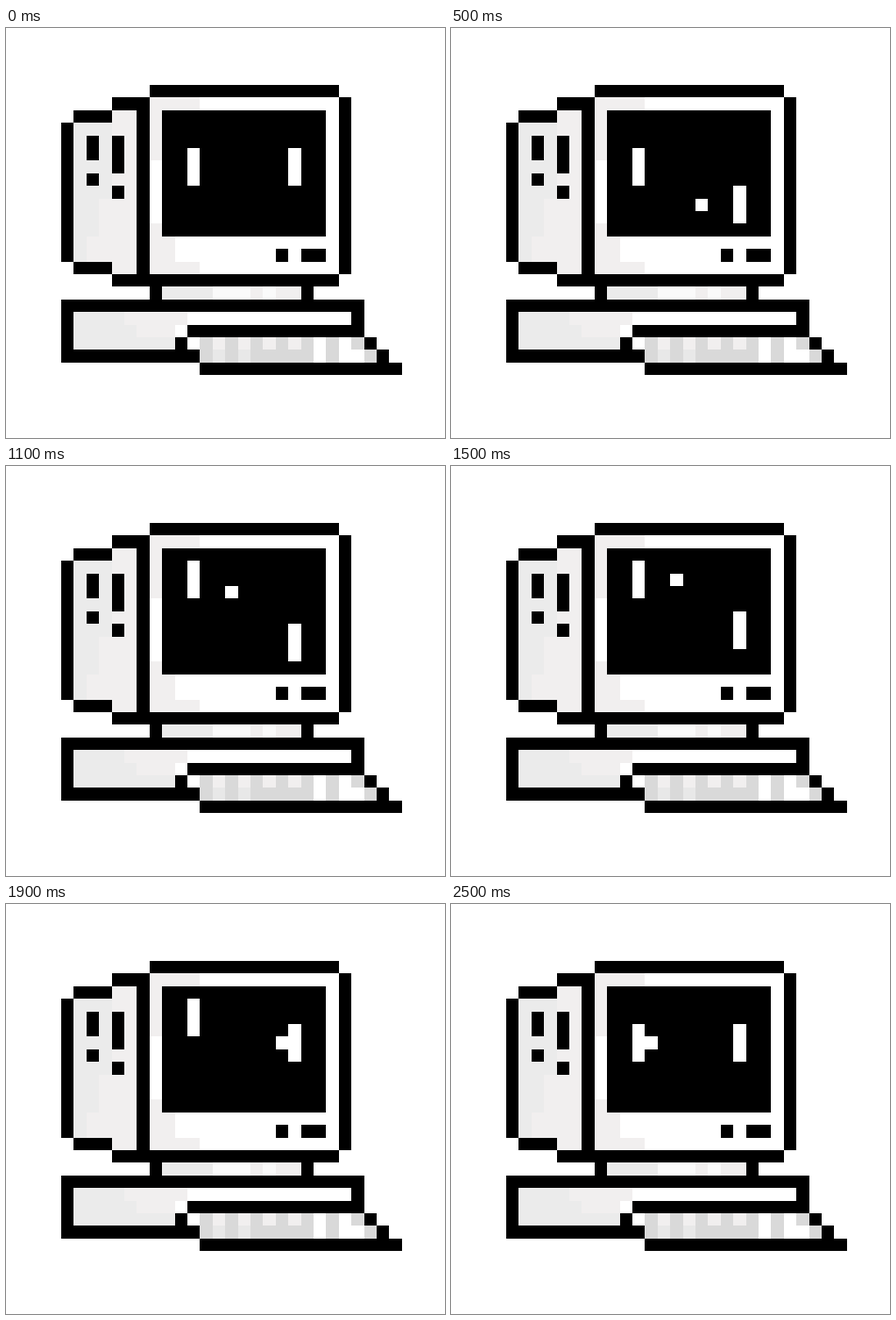
An HTML page for the animation above (2600 ms loop, 501 by 468 pixels).

```html
<!DOCTYPE html>
<html lang="en">
<head>
<meta charset="utf-8">
<title>Pixel computer playing paddle ball</title>
<style>
html, body { margin: 0; width: 100%; height: 100%; overflow: hidden; background: #fff; }
svg { display: block; width: 501px; height: 468px; }
</style>
</head>
<body>
<svg id="stage" viewBox="0 0 501 468" shape-rendering="crispEdges"></svg>
<script>
const stage = document.getElementById('stage');
const CELL = 14.4, LOOP = 2600, STEP = 100;
const BLACK = '#000', WHITE = '#fff', SHADE = '#ebebeb', PALE = '#f1efef', KEY = '#d9d9d9';

const px = c => Math.round(63 + c * CELL);
const py = r => Math.round(65 + r * CELL);

function place(el, c, r, w, h) {
  el.setAttribute('x', px(c));
  el.setAttribute('y', py(r));
  el.setAttribute('width', px(c + w) - px(c));
  el.setAttribute('height', py(r + h) - py(r));
}

// Column, row, width and height are in grid cells.
function block(fill, c, r, w = 1, h = 1) {
  const el = document.createElementNS('http://www.w3.org/2000/svg', 'rect');
  el.setAttribute('fill', fill);
  place(el, c, r, w, h);
  stage.appendChild(el);
  return el;
}

function drawTower() {
  block(SHADE, 1, 3, 3, 11);
  block(PALE, 4, 2, 2, 13);
  block(PALE, 3, 9, 1, 5);
  block(PALE, 2, 12, 1, 2);
  block(BLACK, 0, 3, 1, 11);
  block(BLACK, 1, 2, 3);
  block(BLACK, 4, 1, 3);
  block(BLACK, 1, 14, 3);
  block(BLACK, 2, 4, 1, 2);
  block(BLACK, 2, 7);
  block(BLACK, 4, 4, 1, 3);
  block(BLACK, 4, 8);
}

function drawMonitor() {
  block(PALE, 7, 1, 4);
  block(PALE, 7, 2, 1, 4);
  block(PALE, 7, 11);
  block(PALE, 7, 12, 2, 2);
  block(PALE, 7, 14, 4);
  block(BLACK, 7, 0, 15);
  block(BLACK, 6, 1, 1, 14);
  block(BLACK, 22, 1, 1, 14);
  block(BLACK, 4, 15, 18);
  block(BLACK, 8, 2, 13, 10);
  block(BLACK, 17, 13);
  block(BLACK, 19, 13, 2);
}

function drawBase() {
  block(SHADE, 8, 16, 4);
  block('#fafafa', 12, 16, 3);
  block(PALE, 15, 16);
  block('#fafafa', 16, 16);
  block(PALE, 17, 16, 2);
  block(BLACK, 7, 16);
  block(BLACK, 19, 16);
  block(SHADE, 1, 18, 8, 3);
  block(PALE, 5, 18, 5);
  block(PALE, 6, 19, 3);
  block(BLACK, 0, 17, 24);
  block(BLACK, 0, 17, 1, 5);
  block(BLACK, 23, 17, 1, 3);
  block(BLACK, 10, 19, 14);
  block(BLACK, 9, 20);
  block(BLACK, 0, 21, 11);
}

function drawKeyboard() {
  for (let c = 11; c < 24; c++) {
    block(c % 2 ? KEY : c < 20 ? PALE : WHITE, c, 20);
  }
  block(KEY, 11, 21, 9);
  block('#e8e8e8', 12, 21);
  block('#e8e8e8', 14, 21);
  block(KEY, 21, 21);
  block(KEY, 24, 21);
  block(BLACK, 24, 20);
  block(BLACK, 25, 21);
  block(BLACK, 11, 22, 16);
}

// Keys are [step, value]; the result snaps to the grid.
function track(keys, t) {
  for (let i = 1; i < keys.length; i++) {
    const [t0, a] = keys[i - 1], [t1, b] = keys[i];
    if (t <= t1) return Math.round(a + (b - a) * (t - t0) / (t1 - t0));
  }
  return keys[keys.length - 1][1];
}

const ballCol = [[0, 10], [7, 17], [13, 11], [19, 17], [26, 10]];
const ballRow = [[0, 6], [7, 10], [13, 3], [19, 6], [26, 6]];
const leftRow = [[0, 6], [6, 6], [12, 4], [19, 4], [22, 6]];
const rightRow = [[0, 6], [6, 9], [12, 9], [18, 6]];

drawTower();
drawMonitor();
drawBase();
drawKeyboard();
const left = block(WHITE, 10, 5, 1, 3);
const right = block(WHITE, 18, 5, 1, 3);
const ball = block(WHITE, 10, 6);

function render(ms) {
  const t = Math.floor((ms % LOOP) / STEP);
  place(left, 10, track(leftRow, t) - 1, 1, 3);
  place(right, 18, track(rightRow, t) - 1, 1, 3);
  place(ball, track(ballCol, t), track(ballRow, t), 1, 1);
}

const start = performance.now();
function tick() {
  render(performance.now() - start);
  requestAnimationFrame(tick);
}
tick();
</script>
</body>
</html>
```
